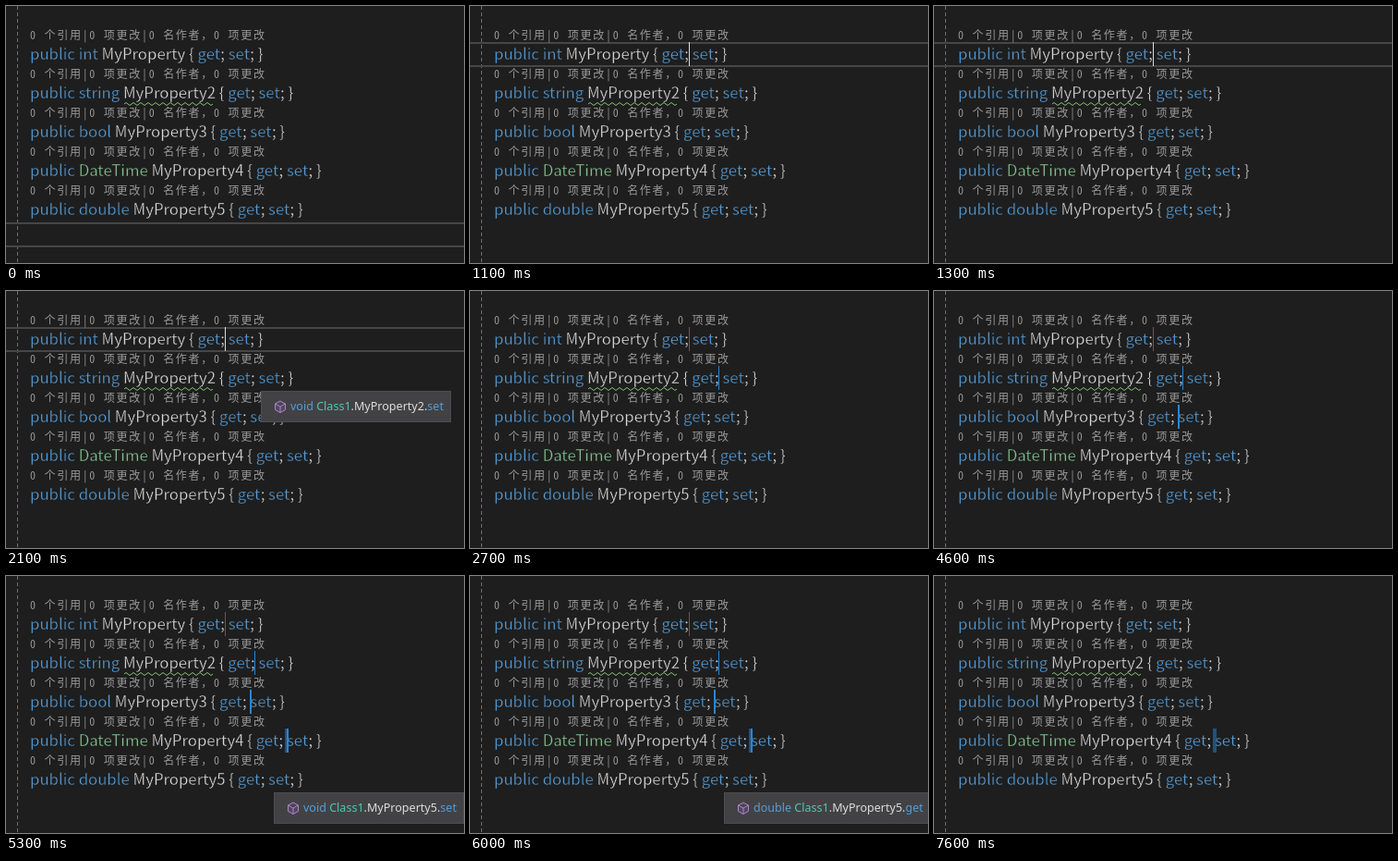
An HTML page that plays this animation: 496 px wide and 278 px high, repeating every 8 s.

```html
<!DOCTYPE html>
<html lang="zh-CN">
<head>
<meta charset="utf-8">
<title>Multi-caret editing</title>
<style>
  html, body { margin: 0; width: 100%; height: 100%; overflow: hidden; background: #1e1e1e; }
  svg { display: block; width: 496px; height: 278px; }
  text { fill: #dcdcdc; white-space: pre; }
  /* The background-coloured outline thins the regular weight. */
  .code { font-family: "Noto Sans CJK SC", "Noto Sans", sans-serif; font-weight: 300; font-size: 17px; stroke: #1e1e1e; stroke-width: .3px; }
  .lens { font-family: "Noto Sans Mono CJK SC", "Noto Sans CJK SC", monospace; font-size: 12px; letter-spacing: .14em; fill: #999; }
  .tip { font-family: "Noto Sans", "Open Sans", sans-serif; font-size: 12.5px; }
  .key { fill: #569cd6; }
  .struct { fill: #86c691; }
  .class { fill: #4ec9b0; }
  .hover { fill: #55aaff; }
</style>
</head>
<body>
<svg id="stage" viewBox="0 0 496 278"></svg>
<script>
const LOOP = 8000, LEFT = 26, ROW = 42, FIRST_TOP = 39;
const stage = document.getElementById('stage');
const rowTop = row => FIRST_TOP + row * ROW;
const span = (kind, text) => `<tspan class="${kind}">${text}</tspan>`;

const properties = [
  ['int', 'MyProperty'], ['string', 'MyProperty2'], ['bool', 'MyProperty3'],
  ['DateTime', 'MyProperty4'], ['double', 'MyProperty5']
];

const carets = [
  { x: 237, width: 1, color: '#dcdcdc', from: 1100 },
  { x: 269, width: 1, color: '#2488d8', from: 2400 },
  { x: 264, width: 2, color: '#2488d8', from: 3700 },
  { x: 304, width: 2, color: '#2488d8', from: 4900 },
  { x: 279, width: 1, color: '#2488d8', from: 7200 }
];
// Carets alternate between shown and hidden at these times.
const blinks = [1100, 1600, 2100, 2900, 3500, 4200, 4600, 5400, 5900, 6400, 6900, 7600];

const tips = [
  { row: 1, x: 276, type: 'void', accessor: 'set', from: 2000, to: 2400 },
  { row: 2, x: 276, type: 'void', accessor: 'set', from: 3000, to: 3500 },
  { row: 3, x: 290, type: 'void', accessor: 'set', from: 4200, to: 4600 },
  { row: 4, x: 290, type: 'void', accessor: 'set', from: 5300, to: 5600 },
  { row: 4, x: 275, type: 'double', accessor: 'get', from: 6000, to: 6400 }
];
const lensHovers = [
  { row: 1, from: 1500, to: 1700 },
  { row: 3, from: 3600, to: 3800 }
];

function codeLine([type, name], row) {
  const kind = type === 'DateTime' ? 'struct' : 'key';
  return `<text class="lens" x="${LEFT}" y="${rowTop(row) - 3}">0 个引用|0 项更改|<tspan>0 名作者，0 项更改</tspan></text>
    <text class="code" x="${LEFT}" y="${rowTop(row) + 19}">${span('key', 'public')} ${span(kind, type)} ${name} { ${span('key', 'get')}; ${span('key', 'set')}; }</text>`;
}

function caretShape({ x, width, color }, row) {
  return `<rect class="caret" x="${x}" y="${rowTop(row)}" width="${width}" height="26" fill="${color}"/>`;
}

function tipShape({ row, x, type, accessor }) {
  const width = type === 'void' ? 206 : 222;
  return `<g class="popup" transform="translate(${x} ${rowTop(row) + 27})">
    <rect x=".5" y=".5" width="${width - 1}" height="33" fill="#424245" stroke="#4d4d50"/>
    <path d="M21 11l5.5 3v6.5l-5.5 3-5.5-3V14zM15.5 14l5.5 3 5.5-3M21 17v6.5" fill="#b180d722" stroke="#b180d7" stroke-linejoin="round"/>
    <text class="tip" x="32" y="21">${span('key', type)} ${span('class', 'Class1')}.${properties[row][1]}.${span('key', accessor)}</text>
  </g>`;
}

function squiggle(x, y, end) {
  const waves = Math.floor((end - x) / 4) - 1;
  return `<path d="M${x} ${y}q2 -3 4 0${'t4 0'.repeat(waves)}" fill="none" stroke="#86c270"/>`;
}

stage.innerHTML = `
  <rect width="496" height="278" fill="#1e1e1e"/>
  <path d="M12.5 0V278" stroke="#717171" stroke-dasharray="4 3"/>
  <rect id="currentLine" x="-4" width="504" height="25" fill="none" stroke="#464646" stroke-width="2"/>
  <rect id="selection" x="302" y="${rowTop(3)}" width="4" height="26" fill="#264f78"/>
  ${properties.map(codeLine).join('')}
  ${squiggle(128, 106, 226)}
  ${carets.map(caretShape).join('')}
  ${tips.map(tipShape).join('')}`;

const all = selector => [...stage.querySelectorAll(selector)];

// Choose the font size at which the first text of a class has its natural length.
function fitFont(name, length) {
  const texts = all('text.' + name);
  const size = parseFloat(getComputedStyle(texts[0]).fontSize);
  const fitted = size * length / texts[0].getComputedTextLength();
  texts.forEach(text => text.style.fontSize = fitted + 'px');
}
fitFont('code', 252.5);
fitFont('lens', 256);
fitFont('tip', 166);

const caretNodes = all('.caret'), tipNodes = all('.popup'), lensNodes = all('.lens tspan');
const currentLine = document.getElementById('currentLine');
const selection = document.getElementById('selection');
const show = (node, visible) => node.setAttribute('visibility', visible ? 'visible' : 'hidden');
const during = (t, { from, to }) => t >= from && t < to;

function draw(t) {
  show(currentLine, t < 2400);
  currentLine.setAttribute('y', t < 1100 ? 235 : 40);
  show(selection, t >= 4900);

  const lit = blinks.filter(time => t >= time).length % 2 === 1;
  caretNodes.forEach((node, i) => show(node, lit && t >= carets[i].from));
  caretNodes[0].setAttribute('fill', t < 2400 ? '#dcdcdc' : '#705454');

  tipNodes.forEach((node, i) => show(node, during(t, tips[i])));
  lensNodes.forEach((node, row) =>
    node.classList.toggle('hover', lensHovers.some(h => h.row === row && during(t, h))));
}

const start = performance.now();
function tick() {
  draw((performance.now() - start) % LOOP);
  requestAnimationFrame(tick);
}
draw(0);
requestAnimationFrame(tick);
</script>
</body>
</html>
```
